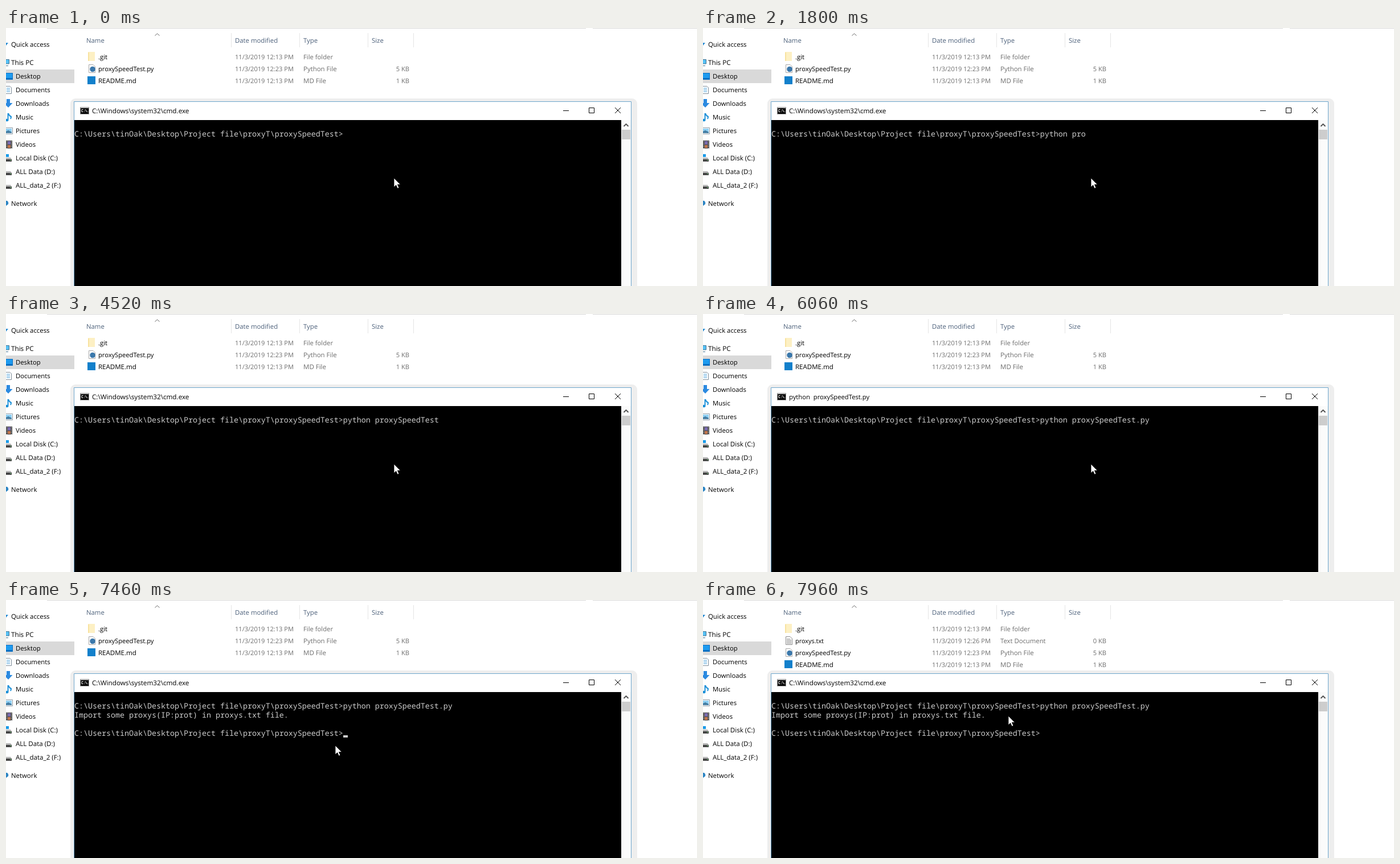
Write an HTML page that moves like this. It is 1213 px wide and 454 px high and loops after 8000 ms.

```html
<!DOCTYPE html>
<html lang="en">
<head>
<meta charset="utf-8">
<title>Console session</title>
<style>
  html, body { margin: 0; width: 100%; height: 100%; overflow: hidden; background: #fff; }
  svg { display: block; width: 100vw; height: 100vh; }
  text { font: 11.4px "Open Sans", "Noto Sans", sans-serif; white-space: pre; text-rendering: geometricPrecision; }
  #lines text { font: 13.333px "Noto Sans Mono", "DejaVu Sans Mono", monospace; fill: #ccc; }
</style>
</head>
<body>
<svg viewBox="0 0 1213 454">
  <rect width="1213" height="454" fill="#fff"/>
  <path d="M72 .5H1018M1030 .5H1213" stroke="#d9d9d9"/>
  <path d="M395.5 9V34M515.5 9V34M635.5 9V34M715.5 9V34" stroke="#e5e5e5"/>
  <path d="M261.5 13.5L265.5 9.8L269.5 13.5" fill="none" stroke="#666"/>
  <rect y="73" width="120" height="24" fill="#d9d9d9"/>
  <g id="labels"></g>

  <g id="sideIcons">
    <path d="M0 26H4L0 31Z" fill="#2a8dd4"/>
    <path d="M0 55.5H5.5V63H0M0 66.5H4" fill="#56c1f5" stroke="#44728f"/>
    <rect y="79" width="12" height="12" fill="#0a6fc2"/>
    <rect y="80" width="11" height="8" fill="#1e9bef"/>
    <path d="M0 102.5H7L9.5 105V115.5H0" fill="#fff" stroke="#7d8c99"/>
    <path d="M1 106H7M1 109H7M1 112H7" stroke="#3f9bd9"/>
    <path d="M1 125H7V132H11.5L4 140L0 136V132H1Z" fill="#2b8ae0"/>
    <path d="M3.5 150V161M4 150Q5 154 9 156Q9 158 8 160" fill="none" stroke="#1b90d8" stroke-width="2"/>
    <ellipse cx="1.5" cy="162" rx="3" ry="2.3" fill="#1b90d8"/>
    <path d="M0 175.5H11.5V186.5H0" fill="#fff" stroke="#8c9aa5"/>
    <path d="M0 177H10V185H0Z" fill="#8fd0f3"/>
    <path d="M0 182L4 180L10 183V185H0Z" fill="#447da3"/>
    <rect y="198" width="11" height="14" fill="#454545"/>
    <path d="M1.5 199V212M9.5 199V212" stroke="#ddd" stroke-dasharray="1.5 1.5"/>
    <rect x="3" y="199" width="5" height="6" fill="#7a6cb0"/>
    <rect x="3" y="206" width="5" height="5" fill="#c2774e"/>
    <rect y="222" width="5" height="5" fill="#1b9be8"/>
    <path d="M0 304H2Q5 306 4 310L0 313Z" fill="#2e86c4"/>
  </g>

  <g id="files"></g>

  <rect x="113" y="124" width="995" height="350" rx="9" fill="#eee"/>
  <path d="M119.5 454V129.5H1097.5V454" fill="#fff" stroke="#6ea6cc"/>
  <rect x="120" y="162" width="960" height="292" fill="#000"/>
  <rect x="1080" y="162" width="17" height="292" fill="#fbfbfb"/>
  <rect x="1081" y="179" width="15" height="17" fill="#cdcdcd"/>
  <path d="M1084.5 173L1088.5 169L1092.5 173" fill="none" stroke="#505050" stroke-width="1.8"/>
  <path d="M978 145.5H988M1023.5 140.5H1032.5V149.5H1023.5ZM1069 140L1079 150M1079 140L1069 150" fill="none" stroke="#000"/>
  <rect x="130.5" y="139.5" width="15" height="12" fill="#000" stroke="#999"/>
  <path d="M131 140.5H145" stroke="#ddd"/>
  <path d="M135.5 143.5H133V147.5H135.5M137.5 144V145M137.5 147V148M139.5 143L141.5 148M143 147.5H144" fill="none" stroke="#fff"/>
  <text id="title" x="151" y="150"></text>
  <g id="lines"></g>
  <rect id="caret" width="8" height="4" fill="#ccc"/>
  <path id="pointer" d="M0 0V16L3.7 12.6L6.3 18.3L8.9 17.2L6.4 11.6H11.4Z" fill="#fff" stroke="#000" stroke-width=".8"/>
</svg>

<script>
const LOOP = 8000;
const $ = id => document.getElementById(id);

function add(parent, tag, attrs, content = "") {
  const el = document.createElementNS("http://www.w3.org/2000/svg", tag);
  for (const key in attrs) el.setAttribute(key, attrs[key]);
  el.textContent = content;
  return parent.appendChild(el);
}

function label(parent, x, y, str, fill = "#000", size = 11.4, anchor = "start") {
  return add(parent, "text", { x, y, fill, "text-anchor": anchor, style: `font-size:${size}px` }, str);
}

// Folder columns and navigation pane
[[141, "Name"], [402, "Date modified"], [522, "Type"], [642, "Size"]]
  .forEach(([x, str]) => label($("labels"), x, 26, str, "#4c607a", 11.35));
label($("labels"), 9, 33, "Quick access");
label($("labels"), 9, 65, "This PC", "#000", 11.7);
["Desktop", "Documents", "Downloads", "Music", "Pictures", "Videos",
  "Local Disk (C:)", "ALL Data (D:)", "ALL_data_2 (F:)"]
  .forEach((str, i) => label($("labels"), 17, 89 + 24 * i, str, "#000", i > 5 ? 11.55 : 11.3));
label($("labels"), 9, 313, "Network");

[228, 252, 276].forEach(y => {
  add($("sideIcons"), "path", { d: `M0 ${y}H8L10 ${y + 3}H0Z`, fill: "#b9b9b9" });
  add($("sideIcons"), "rect", { y: y + 3, width: 10, height: 4, fill: "#444" });
  add($("sideIcons"), "rect", { x: 7, y: y + 4, width: 2, height: 1, fill: "#7fe08a" });
});

// Folder rows
const page = "M145.5 43.5H153L156.5 47V57.5H145.5Z";
const icons = {
  folder(g) {
    add(g, "path", { d: "M144 42H156V58H144Z", fill: "#fdf0c4" });
    add(g, "path", { d: "M144 43H146V58H144Z", fill: "#f8e3a0" });
  },
  text(g) {
    add(g, "path", { d: page, fill: "#fff", stroke: "#8b8b8b" });
    add(g, "path", { d: "M147 47.5H153M147 49.5H155M147 51.5H155M147 53.5H155M147 55.5H155", stroke: "#999" });
  },
  script(g) {
    add(g, "path", { d: page, fill: "#fff", stroke: "#a8a8a8" });
    add(g, "circle", { cx: 152, cy: 51.5, r: 4.8, fill: "#3b78ab" });
  },
  markdown(g) {
    add(g, "rect", { x: 143, y: 43, width: 14, height: 14, fill: "#1380cb" });
  }
};

function fileRow(icon, name, time, type, size, nameSize, typeSize) {
  const g = add($("files"), "g", {});
  icons[icon](g);
  label(g, 162, 55, name, "#000", nameSize);
  label(g, 402, 55, `11/3/2019 ${time} PM`, "#6d6d6d", 11.05);
  label(g, 522, 55, type, "#6d6d6d", typeSize);
  label(g, 708, 55, size, "#6d6d6d", 11.1, "end");
  return g;
}

fileRow("folder", ".git", "12:13", "File folder", "", 11.3, 11.25);
const newFile = fileRow("text", "proxys.txt", "12:26", "Text Document", "0 KB", 10.9, 11.3);
const oldFiles = [
  fileRow("script", "proxySpeedTest.py", "12:23", "Python File", "5 KB", 11.15, 11.45),
  fileRow("markdown", "README.md", "12:13", "MD File", "1 KB", 11.5, 11.5)
];
newFile.setAttribute("transform", "translate(0 21)");

// Console
const PROMPT = "C:\\Users\\tinOak\\Desktop\\Project file\\proxyT\\proxySpeedTest>";
const COMMAND = "python proxySpeedTest.py";
const keyTimes = [150, 260, 360, 830, 970, 1020, 1150, 1620, 1710, 1800, 1990, 2080,
  2630, 3020, 3380, 3450, 3670, 4040, 4190, 4440, 4520, 4650, 4830, 4980];
const caretOn = [[50, 150], [740, 830], [1290, 1620], [2310, 2630], [2830, 3020], [3300, 3380],
  [3910, 4040], [4370, 4440], [4980, 6060], [7080, 7610]];
const ENTER = 5520, RUN = 5560, OUTPUT = 6430, DONE = 6540, REFRESH = 7760;

const lines = [191, 207, 239].map(y => add($("lines"), "text", { x: 120, y }));

function pointerAt(t) {
  if (t < 7410) return [681, 264];
  if (t < 7460) return [632, 261];
  const p = Math.min(1, Math.floor((t - 7460) / 50) / 10);
  const e = p * p * (3 - 2 * p);
  return [578 - 42 * e, 256 - 52 * e];
}

function caretAt(t, typed) {
  if (t < ENTER) return [592 + 8 * typed, 190];
  return t < OUTPUT ? [120, 206] : [592, 238];
}

function setText(el, str) {
  if (el.textContent !== str) el.textContent = str;
}

function draw(t) {
  const typed = keyTimes.filter(k => t >= k).length;
  setText(lines[0], PROMPT + COMMAND.slice(0, typed));
  setText(lines[1], t >= OUTPUT ? "Import some proxys(IP:prot) in proxys.txt file." : "");
  setText(lines[2], t >= DONE ? PROMPT : "");

  const running = t >= RUN && t < DONE;
  setText($("title"), running ? "python  proxySpeedTest.py" : "C:\\Windows\\system32\\cmd.exe");
  $("title").style.fontSize = running ? "11.25px" : "11.7px";

  const [cx, cy] = caretAt(t, typed);
  $("caret").setAttribute("x", cx);
  $("caret").setAttribute("y", cy);
  $("caret").setAttribute("visibility", caretOn.some(([a, b]) => t >= a && t < b) ? "visible" : "hidden");

  const fresh = t >= REFRESH;
  newFile.setAttribute("visibility", fresh ? "visible" : "hidden");
  oldFiles.forEach((g, i) => g.setAttribute("transform", `translate(0 ${21 * (i + 1 + fresh)})`));
  $("pointer").setAttribute("transform", `translate(${pointerAt(t).map(Math.round)})`);
}

const start = performance.now();
function tick() {
  draw((performance.now() - start) % LOOP);
  requestAnimationFrame(tick);
}
tick();
</script>
</body>
</html>
```
